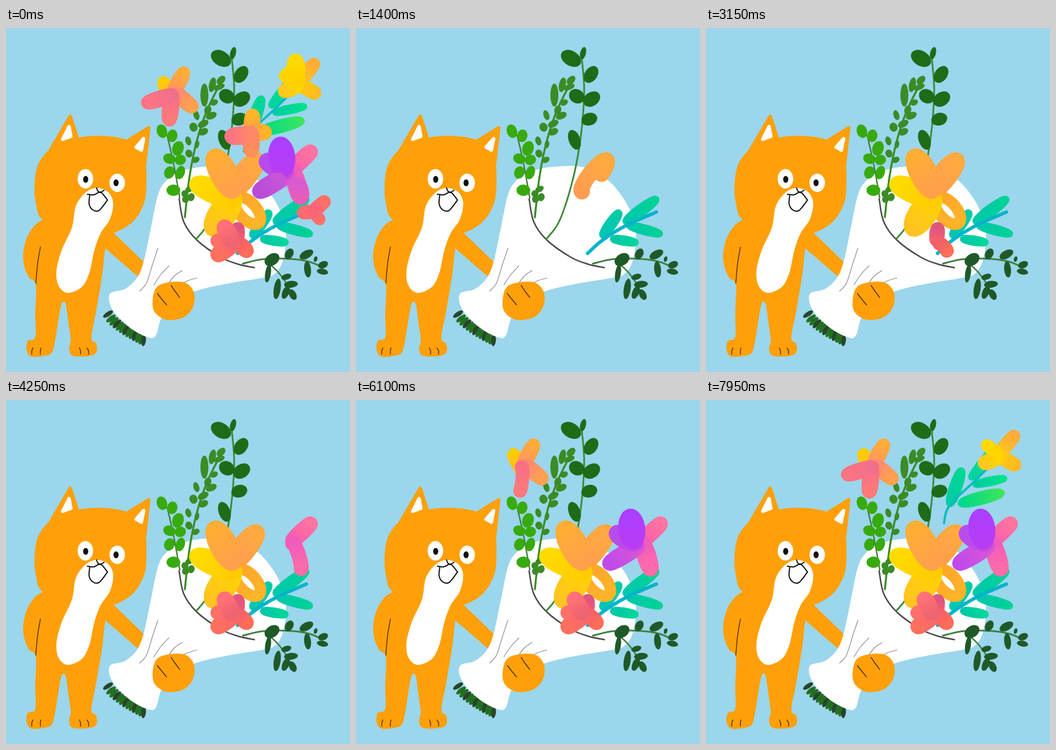
Animation, 600 px wide and 600 px high, one loop 8 s. Source, as an HTML page with a canvas:

```html
<!DOCTYPE html>
<html lang="en">
<head>
<meta charset="utf-8">
<title>Cat with a bouquet</title>
<style>
html, body { margin: 0; width: 100%; height: 100%; overflow: hidden; background: #9bd6ec; }
canvas { display: block; width: 100vw; height: 100vh; }
</style>
</head>
<body>
<canvas id="stage" width="600" height="600"></canvas>
<script>
const SIZE = 600, LOOP = 8000, STEP = 50;
const SKY = '#9bd6ec', ORANGE = '#ffa00a', WHITE = '#fff', INK = '#111';
const ctx = document.getElementById('stage').getContext('2d');

function layer(paint) {
  const c = document.createElement('canvas');
  c.width = c.height = SIZE;
  const g = c.getContext('2d');
  g.lineCap = g.lineJoin = 'round';
  paint(g);
  return c;
}

// Smooth path through flat [x, y, x, y, ...] points
function curve(p, closed) {
  const n = p.length / 2, path = new Path2D();
  const at = i => {
    const k = closed ? (i + n) % n : Math.max(0, Math.min(n - 1, i));
    return [p[2 * k], p[2 * k + 1]];
  };
  path.moveTo(p[0], p[1]);
  for (let i = 0; i < (closed ? n : n - 1); i++) {
    const [a, b, c, d] = [at(i - 1), at(i), at(i + 1), at(i + 2)];
    path.bezierCurveTo(b[0] + (c[0] - a[0]) / 6, b[1] + (c[1] - a[1]) / 6,
      c[0] - (d[0] - b[0]) / 6, c[1] - (d[1] - b[1]) / 6, c[0], c[1]);
  }
  return path;
}

function blob(g, color, pts) {
  g.fillStyle = color;
  g.fill(curve(pts, true));
}

function line(g, color, width, pts) {
  g.strokeStyle = color;
  g.lineWidth = width;
  g.stroke(curve(pts));
}

function oval(g, color, x, y, rx, ry, turn = 0) {
  g.fillStyle = color;
  g.beginPath();
  g.ellipse(x, y, rx, ry, turn, 0, 7);
  g.fill();
}

function spike(g, color, pts) {
  const path = new Path2D();
  for (let i = 0; i < pts.length; i += 2) path.lineTo(pts[i], pts[i + 1]);
  path.closePath();
  g.fillStyle = g.strokeStyle = color;
  g.lineWidth = 6;
  g.fill(path);
  g.stroke(path);
}

function leaves(g, color, list) {
  for (const l of list) oval(g, color, ...l);
}

function paintCat(g) {
  spike(g, ORANGE, [78, 212, 112, 154, 124, 191, 110, 225]);
  spike(g, ORANGE, [212, 197, 249, 174, 242, 236, 220, 235]);
  // arm
  spike(g, ORANGE, [186, 360, 240, 412, 234, 433, 168, 376]);
  // torso, legs and feet
  blob(g, ORANGE, [66, 334, 42, 355, 31, 385, 31, 412, 40, 435, 52, 448, 51, 500, 51, 539,
    38, 546, 36, 562, 44, 573, 66, 572, 80, 566, 86, 543, 91, 512, 97, 481, 104, 481,
    109, 515, 113, 544, 110, 560, 117, 572, 146, 572, 158, 565, 157, 550, 149, 540,
    158, 490, 168, 430, 174, 382, 188, 356, 130, 320]);
  // head
  blob(g, ORANGE, [74, 213, 92, 200, 127, 191, 160, 188, 200, 192, 230, 205, 243, 232, 245, 272,
    241, 305, 222, 337, 187, 357, 130, 360, 66, 336, 52, 305, 50, 270, 56, 238]);
  spike(g, WHITE, [110, 172, 99, 194, 113, 189]);
  spike(g, WHITE, [240, 193, 227, 208, 236, 213]);
  blob(g, WHITE, [140, 286, 160, 279, 179, 287, 187, 306, 181, 334, 165, 358, 154, 388, 146, 425,
    133, 451, 108, 462, 92, 450, 88, 424, 97, 388, 115, 348, 122, 310]);
  oval(g, WHITE, 138.5, 263, 13.5, 17);
  oval(g, WHITE, 194, 270, 13.5, 16);
  oval(g, INK, 139, 264, 4.5, 6);
  oval(g, INK, 192, 270, 4.5, 6);
  line(g, INK, 2, [158, 279, 160, 284, 164, 287, 171, 283]);
  line(g, INK, 2, [142, 290, 153, 291, 164, 286, 170, 291, 177, 300]);
  line(g, INK, 2, [146, 292, 145, 307, 151, 317, 161, 319, 169, 311, 177, 300]);
  line(g, '#4a2c08', 1.4, [60, 382, 55, 412, 52, 445]);
  for (const [x, d] of [[47, -2], [61, -1], [128, 2], [141, 3]])
    line(g, '#4a2c08', 1.4, [x, 558, x + d, 563, x + d, 569]);
}

function paintWrap(g) {
  for (let i = 0; i < 13; i++) {
    const u = i / 12, x = 178 + 62 * u, y = 499 + 46 * Math.pow(u, 0.72);
    oval(g, i % 3 ? '#236f22' : '#28442a', x, y, 4, 10, 1.0 - 0.9 * u);
  }
  blob(g, WHITE, [283, 263, 305, 250, 345, 242, 398, 243, 440, 266, 473, 308, 488, 356, 483, 405,
    467, 430, 440, 437, 385, 446, 330, 459, 288, 478, 270, 508, 261, 537, 246, 539,
    215, 522, 186, 492, 181, 464, 208, 455, 229, 435, 241, 404, 253, 347, 266, 288]);
  const fold = '#888';
  line(g, fold, 1.2, [265, 384, 255, 414, 245, 445, 233, 459]);
  line(g, fold, 1.2, [284, 415, 270, 430, 258, 448]);
  line(g, fold, 1.2, [307, 423, 293, 433, 280, 451]);
  line(g, fold, 1.2, [333, 436, 319, 440, 306, 446]);
  blob(g, ORANGE, [256, 472, 264, 451, 288, 443, 314, 445, 328, 462, 326, 487, 309, 505, 280, 509, 259, 495]);
  line(g, '#4a2c08', 1.5, [264, 463, 271, 472, 280, 483]);
  line(g, '#4a2c08', 1.5, [288, 449, 294, 458, 303, 470]);
}

function paintGreens(g) {
  const dark = '#1f6b18', mid = '#3b8b26', light = '#37aa0d', deep = '#1f5928';
  line(g, '#4a4a4a', 2.6, [302, 298, 310, 338, 333, 370, 375, 400, 405, 412, 433, 418]);

  line(g, '#3c8a38', 3, [394, 55, 398, 110, 392, 190, 378, 265, 355, 336, 332, 368]);
  leaves(g, dark, [[375, 53, 19, 13, .55], [396, 44, 5, 11, .25], [410, 81, 11, 16, .6],
    [385, 119, 14, 12, .6], [411, 124, 16, 12, -.6], [407, 159, 14, 11, -.3], [381, 195, 10, 18, -.35]]);

  line(g, mid, 3.4, [376, 92, 350, 145, 332, 200, 320, 260, 312, 330]);
  leaves(g, mid, [[360, 99, 6, 13, .2], [375, 91, 9, 6, -.8], [346, 117, 7, 20, 0], [372, 103, 10, 5, -.4],
    [363, 130, 7, 5, -.5], [352, 143, 6, 8, .3], [332, 152, 5, 9, -.3], [358, 153, 10, 6, -.4],
    [344, 167, 10, 6, -.5], [327, 173, 7, 8, -.4], [344, 181, 9, 6, -.4], [318, 197, 5, 8, -.3],
    [333, 203, 4, 7, .2], [319, 219, 6, 7, -.4], [331, 230, 7, 5, -.5], [320, 281, 8, 5, -.5],
    [311, 289, 5, 6, 0], [323, 295, 6, 7, .3], [313, 299, 6, 6, 0]]);

  line(g, '#447b3a', 2.4, [281, 187, 292, 235, 303, 296]);
  leaves(g, light, [[272, 180, 9, 12, -.3], [290, 188, 9, 11, .2], [300, 210, 10, 13, .3], [285, 228, 11, 9, .3],
    [304, 230, 10, 9, -.3], [285, 252, 9, 11, .4], [304, 252, 8, 12, .3], [292, 283, 12, 10, 0]]);

  line(g, '#417f40', 3, [413, 411, 450, 403, 500, 403, 530, 408, 553, 418]);
  line(g, '#417f40', 2.6, [452, 405, 474, 425, 494, 452]);
  leaves(g, deep, [[494, 394, 7, 10, .5], [524, 395, 13, 7, -.5], [464, 404, 14, 10, -.6], [457, 428, 5, 16, .15],
    [473, 455, 6, 18, .15], [489, 434, 9, 5, -.3], [497, 447, 12, 6, -.1], [488, 461, 6, 12, .4],
    [500, 465, 6, 10, -.5], [526, 421, 6, 14, -.1], [553, 413, 9, 6, -.4], [552, 425, 10, 5, .2], [540, 403, 3, 5, .3]]);
}

// Brush loops: [start, end, baseX, baseY, tipX, tipY, spread, width, baseColor, tipColor, filled]
const PETALS = [
  // lower sprig
  [550, 820, 431, 361, 458, 323, 4, 13, '#00c6b4', '#00cba8'],
  [820, 1000, 471, 337, 523, 299, 5, 12, '#00c8ac', '#00d296'],
  [1000, 1220, 477, 345, 530, 359, 4, 11, '#00c8ac', '#00d296'],
  [1150, 1350, 449, 368, 487, 374, 3, 12, '#00c8a8', '#00d69a'],
  [400, 550, [404, 393, 430, 370, 470, 345, 524, 321], 6, '#00b4cc', '#05b4c8'],
  // large yellow flower
  [1200, 1500, 394, 285, 437, 231, 8, 28, '#ff9c50', '#ffaa40'],
  [1500, 1780, 402, 297, 441, 340, 15, 20, '#ffa62a', '#ffb428'],
  [1780, 2260, 398, 294, 359, 352, 14, 22, '#ffd400', '#ffc322', true],
  [2260, 2600, 398, 300, 332, 272, 9, 25, '#ffcb00', '#ffdc00'],
  [2600, 2950, 396, 284, 364, 224, 11, 27, '#ffa04c', '#ffae34'],
  // small coral flower
  [2960, 3080, 402, 370, 404, 350, 2, 23, '#f4626a', '#e05580'],
  [3080, 3250, 407, 376, 420, 389, 2, 24, '#f4606a', '#ff6c58'],
  [3250, 3420, 395, 378, 370, 395, 2, 27, '#f8686a', '#ff6f5e'],
  [3420, 3580, 392, 373, 369, 371, 1, 25, '#f8686c', '#ff7068'],
  [3580, 3760, 394, 372, 381, 347, 3, 26, '#ee6470', '#ff7078'],
  // purple flower
  [3800, 4100, 500, 245, 531, 216, 2, 26, '#f85cae', '#ff74a0'],
  [4100, 4450, 500, 250, 514, 295, 4, 26, '#f05cbc', '#ff6ca8'],
  [4450, 4750, 492, 255, 442, 285, 4, 25, '#d856d6', '#c04aec'],
  [4750, 5000, 488, 250, 454, 232, 6, 26, '#c648e0', '#b64cee'],
  [5000, 5650, 484, 252, 478, 198, 15, 17, '#b83cf4', '#ac3fff', true],
  // top flower
  [5290, 5480, 289, 123, 275, 95, 2, 22, '#ffb440', '#ffcc00'],
  [5480, 5750, 292, 112, 310, 78, 3, 22, '#ff9460', '#ffac3a'],
  [5750, 6000, 298, 115, 324, 137, 2, 24, '#ff8a70', '#ffa24e'],
  [6000, 6250, 289, 117, 285, 160, 3, 24, '#f87084', '#ff7a7a'],
  [6200, 6450, 290, 117, 247, 130, 3, 23, '#f0708c', '#ff7482'],
  // upper sprig
  [6500, 6680, 426, 180, 445, 124, 5, 13, '#00cca4', '#00d894'],
  [6680, 6850, 463, 135, 505, 83, 4, 11, '#00d4a0', '#00e288'],
  [6830, 6980, 470, 147, 520, 137, 3, 11, '#00cca4', '#00e288'],
  [6980, 7250, 445, 180, 515, 162, 6, 12, '#00d88c', '#3ae65c'],
  [6350, 6500, [415, 215, 421, 190, 440, 168, 470, 140, 512, 98], 4, '#0abcbc', '#08b8c4'],
  // yellow flower
  [7300, 7480, 513, 92, 537, 63, 2, 22, '#ffc420', '#ffac38'],
  [7480, 7620, 515, 100, 538, 113, 1, 24, '#ffca10', '#ffbc20'],
  [7620, 7780, 507, 101, 486, 110, 2, 24, '#ffd400', '#ffc820'],
  [7780, 7930, 508, 93, 490, 79, 1, 21, '#ffd400', '#ffda00'],
  [8000, 8100, 506, 92, 505, 57, 4, 25, '#ffd000', '#ffda00'],
  [8000, 8100, 506, 93, 487, 84, 1, 22, '#ffd000', '#ffd400'],
  // peach flower
  [8000, 8100, 428, 182, 430, 153, 2, 25, '#ff9a50', '#ffb628'],
  [8000, 8100, 428, 182, 451, 182, 2, 26, '#ff9a50', '#ffb428'],
  [8000, 8100, 427, 184, 428, 213, 2, 26, '#ff8468', '#ff9058'],
  [8000, 8100, 426, 186, 395, 189, 2, 28, '#ff8868', '#ff7480'],
  // side flower
  [8000, 8100, 536, 320, 555, 303, 1, 23, '#f86478', '#ff7068'],
  [8000, 8100, 536, 320, 547, 334, 1, 20, '#f86478', '#ff7068'],
  [8000, 8100, 535, 320, 519, 322, 1, 23, '#f86478', '#ff6c70'],
  // purple flower deepens
  [8000, 8100, 508, 272, 514, 295, 4, 26, '#d85cd0', '#e85cbc'],
  [8000, 8100, 476, 265, 442, 285, 4, 25, '#c854d8', '#b84cd8']
];

function loopPoint(x, y, tx, ty, spread, filled, u) {
  const turn = filled ? Math.min(1, u * 1.5) : u;
  const a = 2 * Math.PI * turn;
  let along = (1 - Math.cos(a)) / 2;
  if (filled && u > 2 / 3) along = 3 * u - 2;
  const dx = tx - x, dy = ty - y, side = -Math.sin(a) * spread / Math.hypot(dx, dy);
  return [x + dx * along - dy * side, y + dy * along + dx * side];
}

function stemPoint(p, u) {
  const n = p.length / 2 - 1, i = Math.min(n - 1, Math.floor(u * n)), f = u * n - i;
  const mix = k => {
    const a = p[Math.max(0, i - 1) * 2 + k], b = p[i * 2 + k], c = p[i * 2 + 2 + k];
    const d = p[Math.min(n, i + 2) * 2 + k];
    return b + f / 2 * (c - a + f * (2 * a - 5 * b + 4 * c - d + f * (3 * (b - c) + d - a)));
  };
  return [mix(0), mix(1)];
}

function brush(g, [start, end, ...rest], t) {
  if (t < start) return;
  const u = Math.min(1, (t - start + 10) / (end - start));
  let point, width, from, to, ends;
  if (Array.isArray(rest[0])) {
    const pts = rest[0];
    [, width, from, to] = rest;
    ends = [pts[0], pts[1], pts[pts.length - 2], pts[pts.length - 1]];
    point = v => stemPoint(pts, v);
  } else {
    const [x, y, tx, ty, spread, w, c0, c1, filled] = rest;
    [width, from, to] = [w, c0, c1];
    ends = [x, y, tx, ty];
    point = v => loopPoint(x, y, tx, ty, spread, filled, v);
  }
  const paint = g.createLinearGradient(...ends);
  paint.addColorStop(0, from);
  paint.addColorStop(1, to);
  g.strokeStyle = paint;
  g.lineWidth = width * Math.min(1, .4 + u * 4);
  g.beginPath();
  for (let i = 0; i <= 48; i++) g.lineTo(...point(u * i / 48));
  g.stroke();
}

const flowers = (g, t) => PETALS.forEach(p => brush(g, p, t));

const base = layer(g => {
  paintCat(g);
  paintWrap(g);
  paintGreens(g);
});
const full = layer(g => {
  g.drawImage(base, 0, 0);
  flowers(g, Infinity);
});

function show(img, alpha) {
  ctx.globalAlpha = alpha;
  ctx.drawImage(img, 0, 0);
  ctx.globalAlpha = 1;
}

function draw(now) {
  const t = Math.floor(now % LOOP / STEP) * STEP;
  ctx.lineCap = ctx.lineJoin = 'round';
  ctx.fillStyle = SKY;
  ctx.fillRect(0, 0, SIZE, SIZE);
  const fade = Math.min(1, t / 250);
  if (fade < 1) show(full, 1 - fade);
  if (fade > 0) show(base, fade);
  flowers(ctx, t);
}

let origin;
function tick(now) {
  origin ??= now;
  draw(now - origin);
  requestAnimationFrame(tick);
}
draw(0);
requestAnimationFrame(tick);
</script>
</body>
</html>
```
